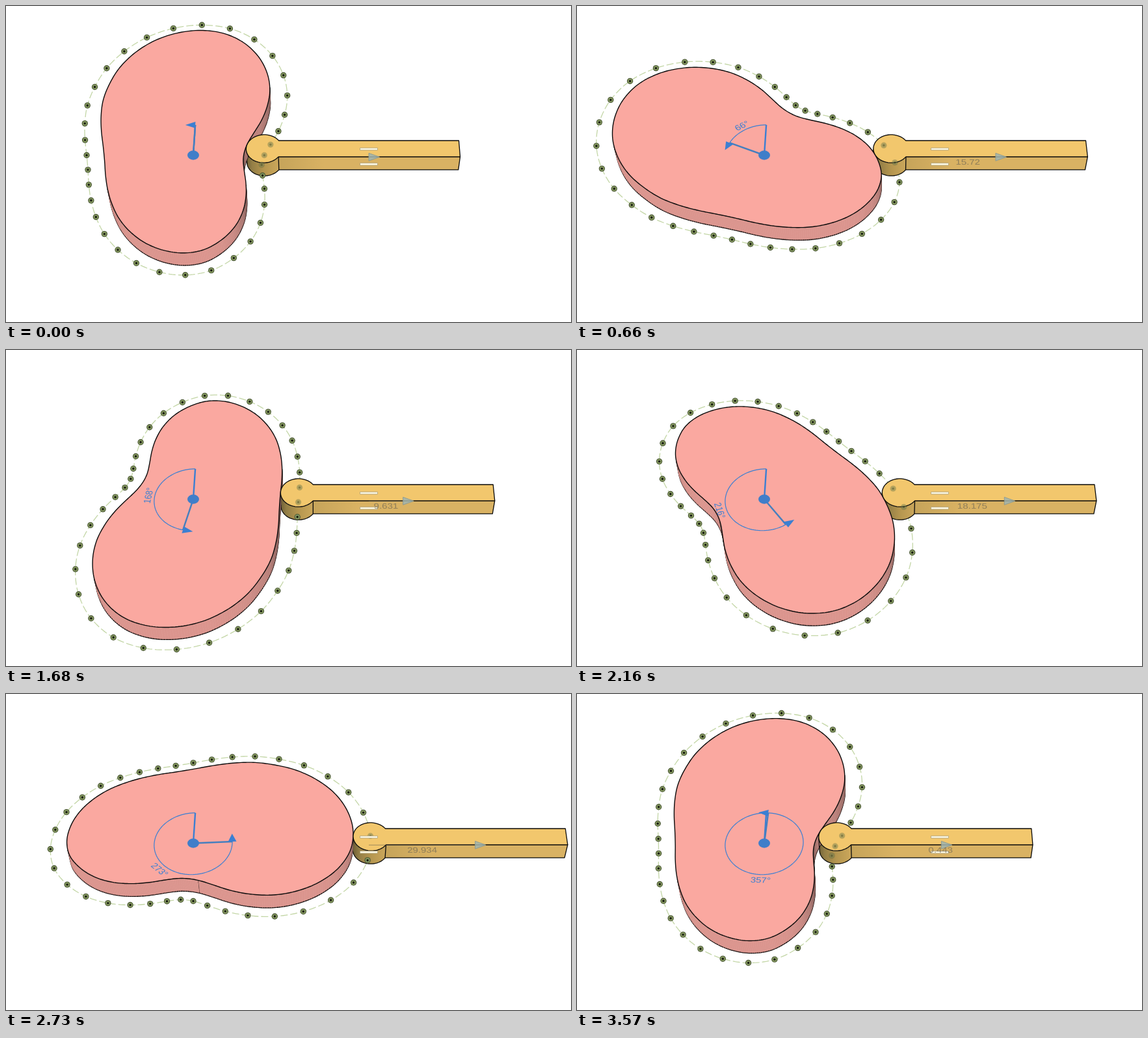
Recreate the animation shown at these times as an HTML page with a canvas. Size 869x486 px, loop 3.6 s.

```html
<!DOCTYPE html>
<html lang="en">
<head>
<meta charset="utf-8">
<title>Cam and follower</title>
<style>
  html, body { margin: 0; width: 100%; height: 100%; overflow: hidden; background: #fff; }
  canvas { display: block; }
</style>
</head>
<body>
<canvas id="stage" width="869" height="486"></canvas>
<script>
const ctx = document.getElementById('stage').getContext('2d');
const RAD = Math.PI / 180;
const LOOP = 3600, STEP = 30;

// Pitch radius in mm for every 10 degrees of cam rotation
const RADII = [
  20, 19.62, 20.92, 23.41, 26.63, 30.27, 33.83, 36.85, 39.14,
  40, 39.67, 38.59, 36.944, 35.07, 33.1, 31.43, 30.2, 29.584,
  30, 31.48, 33.7, 36.48, 39.346, 42.49, 45.35, 47.78, 49.38,
  50, 49.28, 46.92, 43.28, 38.9, 34.23, 29.49, 25.35, 22.017
];
const MM = 5.465;
const ROLLER = 5 * MM, HALF = 3 * MM, BAR = 15.7, BAR_END = 298.8;
const NECK = Math.asin(BAR / ROLLER);
const INK = '#0a0a0a', BLUE = '#3b7fd2';

// Perspective camera: X right, Y away, Z up, pivot at the origin
const K = 0.000287, KZ = 0.000375, SIN = 0.794, COS = 0.608;
function project(x, y, z = 0) {
  const w = 1 + K * y - KZ * z;
  return [471 + (x - 183) / w, 243 + (-13.5 - SIN * y - COS * z) / w];
}

function lift(deg) {
  const n = RADII.length, p = deg / 10, i = Math.floor(p), u = p - i;
  const [a, b, c, d] = [-1, 0, 1, 2].map(o => RADII[(i + o + n) % n]);
  return b + u / 2 * (c - a + u * (2 * a - 5 * b + 4 * c - d + u * (3 * (b - c) + d - a)));
}

const polar = (r, a) => [r * Math.cos(a), r * Math.sin(a)];
const turn = ([x, y], a) => [x * Math.cos(a) - y * Math.sin(a), x * Math.sin(a) + y * Math.cos(a)];

const pitch = [];
for (let d = 0; d < 360; d++) pitch.push(polar(lift(d) * MM, -d * RAD));

// Cam profile: pitch curve moved inwards by the roller radius
const profile = pitch.map((p, i) => {
  const a = pitch[(i + 359) % 360], b = pitch[(i + 1) % 360];
  const dx = b[0] - a[0], dy = b[1] - a[1], len = Math.hypot(dx, dy);
  return [p[0] + dy / len * ROLLER, p[1] - dx / len * ROLLER];
});

function trace(points, close) {
  ctx.beginPath();
  points.forEach(p => ctx.lineTo(p[0], p[1]));
  if (close) ctx.closePath();
}
function fill(points, color) {
  trace(points, true);
  ctx.fillStyle = color;
  ctx.fill();
}
function line(points, color = INK, width = 1.3, close = false) {
  trace(points, close);
  ctx.strokeStyle = color;
  ctx.lineWidth = width;
  ctx.stroke();
}

function sideColor(nx, ny) {
  const b = Math.max(0, Math.min(1, -ny + (nx < 0 ? 0.25 : 0.05)));
  const f = 1 - (1 - b) ** 2;
  const mix = (lo, hi) => Math.round(lo + (hi - lo) * f);
  return `rgb(${mix(112, 219)},${mix(82, 149)},${mix(78, 142)})`;
}

function camSides(cam, top, base) {
  const quads = [];
  const front = i => {
    const j = (i + 1) % 360, a = top[i], b = top[j], c = base[i];
    return (b[0] - a[0]) * (c[1] - a[1]) - (b[1] - a[1]) * (c[0] - a[0]) < 0;
  };
  for (let i = 0; i < 360; i++) {
    if (!front(i)) continue;
    const j = (i + 1) % 360;
    const dx = cam[j][0] - cam[i][0], dy = cam[j][1] - cam[i][1], len = Math.hypot(dx, dy);
    const edges = [];
    if (i === 0 || !front((i + 359) % 360)) edges.push(i);
    if (!front(j)) edges.push(j);
    quads.push({ i, j, edges, y: (cam[i][1] + cam[j][1]) / 2, color: sideColor(-dy / len, dx / len) });
  }
  quads.sort((a, b) => b.y - a.y);
  return quads;
}

function drawSides(quads, top, base) {
  for (const { i, j, edges, color } of quads) {
    const shape = [top[i], top[j], base[j], base[i]];
    fill(shape, color);
    line(shape, color, 0.7, true);
    line([base[i], base[j]]);
    edges.forEach(e => line([top[e], base[e]]));
  }
}

function rollerArc(x, z, from, to) {
  const out = [];
  for (let n = 0; n <= 40; n++) {
    const [px, py] = polar(ROLLER, from + (to - from) * n / 40);
    out.push(project(x + px, py, z));
  }
  return out;
}

function followerSides(x) {
  const upper = rollerArc(x, HALF, -NECK, -Math.PI), lower = rollerArc(x, -HALF, -NECK, -Math.PI);
  const left = upper[40][0], right = upper[0][0];
  const round = ctx.createLinearGradient(left, 0, right, 0);
  round.addColorStop(0, '#6f6037');
  round.addColorStop(0.18, '#937e46');
  round.addColorStop(0.55, '#b5964f');
  round.addColorStop(1, '#cba75b');
  const flat = ctx.createLinearGradient(right, 0, right + 70, 0);
  flat.addColorStop(0, '#c6a45a');
  flat.addColorStop(1, '#d9b263');

  fill([...upper, ...lower.slice().reverse()], round);
  line([...lower, upper[40]]);
  const bar = [upper[0], project(x + BAR_END, -BAR, HALF), project(x + BAR_END, -BAR, -HALF), lower[0]];
  fill(bar, flat);
  line(bar, INK, 1.3, true);
}

function followerTop(x) {
  const shape = [
    ...rollerArc(x, HALF, -NECK, NECK - 2 * Math.PI),
    project(x + BAR_END, BAR, HALF),
    project(x + BAR_END, -BAR, HALF)
  ];
  fill(shape, '#f2c76d');
  line(shape, INK, 1.3, true);
}

function flatText(text, x, y, angle, color) {
  const [sx, sy] = project(x, y);
  ctx.save();
  ctx.translate(sx, sy);
  ctx.transform(1, 0, (x - 183) * K, 0.79, 0, 0);
  ctx.rotate(angle);
  ctx.font = '15px "Liberation Sans", Arial, sans-serif';
  ctx.textAlign = 'center';
  ctx.textBaseline = 'alphabetic';
  ctx.fillStyle = color;
  ctx.fillText(text, 0, 5.4);
  ctx.restore();
}

function drawDots(spin, x) {
  for (let d = 0; d < 360; d += 10) {
    const [px, py] = turn(pitch[d], spin);
    const hidden = Math.hypot(px - x, py) < ROLLER || Math.hypot(px - x, py - 12.5) < ROLLER;
    const [sx, sy] = project(px, py);
    const disc = (r, color) => {
      ctx.beginPath();
      ctx.arc(sx, sy, r, 0, 7);
      ctx.fillStyle = color;
      ctx.fill();
    };
    ctx.globalAlpha = hidden ? 0.3 : 1;
    disc(4.7, '#4b5837');
    disc(3.6, '#84975f');
    disc(1.7, '#14180e');
  }
  ctx.globalAlpha = 1;
}

function drawSlider(x, mm) {
  const tail = project(x + 160.7, 0)[0];
  line([[558, 232.3], [tail, 232.3]], 'rgba(90,90,80,.55)', 1);
  for (const y of [220, 243.3]) {
    ctx.fillStyle = '#fffbe6';
    ctx.strokeStyle = '#a99c78';
    ctx.lineWidth = 0.8;
    ctx.fillRect(544.5, y - 1.7, 27, 3.4);
    ctx.strokeRect(544.5, y - 1.7, 27, 3.4);
  }
  const head = [[tail, 226.3], [tail + 16.5, 232.2], [tail, 238.2]];
  fill(head, 'rgba(160,180,175,.85)');
  line(head, '#8b9a92', 0.9, true);
  if (mm) flatText(String(+mm.toFixed(3)), 215 + x / 2, -13.3, 0, 'rgba(112,104,84,.7)');
}

function drawAngle(deg) {
  const at = (r, a) => project(...polar(r, a * RAD));
  const end = 90 + deg, hub = project(0, 0);
  if (deg) {
    const arc = [];
    for (let a = 90; a <= end; a += 3) arc.push(at(60, a));
    line(arc, BLUE, 1.2);
    const mid = 90 + deg / 2;
    const rot = (mid < 180 ? 90 : 270) - mid;
    flatText(deg + '°', ...polar(70, mid * RAD), rot * RAD, BLUE);
  }
  line([hub, at(60, 90)], BLUE, 2.4);
  line([hub, at(60, end)], '#467fbe', 2.4);
  const [bx, by] = polar(60, end * RAD), [tx, ty] = polar(15.5, (end + 90) * RAD);
  fill([at(53.5, end), at(66.5, end), project(bx + tx, by + ty)], BLUE);
  ctx.beginPath();
  ctx.ellipse(hub[0], hub[1], 9, 7.2, 0, 0, 7);
  ctx.fillStyle = '#407ec9';
  ctx.fill();
}

function draw(deg) {
  const spin = deg * RAD, mm = lift(deg), x = mm * MM;
  const cam = profile.map(p => turn(p, spin));
  const top = cam.map(p => project(p[0], p[1], HALF));
  const base = cam.map(p => project(p[0], p[1], -HALF));
  const contact = cam[deg][1];

  ctx.fillStyle = '#fff';
  ctx.fillRect(0, 0, 869, 486);
  ctx.lineJoin = 'round';

  ctx.setLineDash([11, 4]);
  line(pitch.map(p => project(...turn(p, spin))), '#c3d6a6', 1.3, true);
  ctx.setLineDash([]);

  const quads = camSides(cam, top, base);
  drawSides(quads.filter(q => q.y > contact), top, base);
  followerSides(x);
  drawSides(quads.filter(q => q.y <= contact), top, base);
  fill(top, '#faa8a0');
  line(top, INK, 1.4, true);
  followerTop(x);

  drawDots(spin, x);
  drawSlider(x, mm - RADII[0]);
  drawAngle(deg);
}

const start = performance.now();
function tick() {
  const t = (performance.now() - start) % LOOP;
  draw(Math.floor(t / STEP) * STEP * 360 / LOOP);
  requestAnimationFrame(tick);
}
tick();
</script>
</body>
</html>
```
